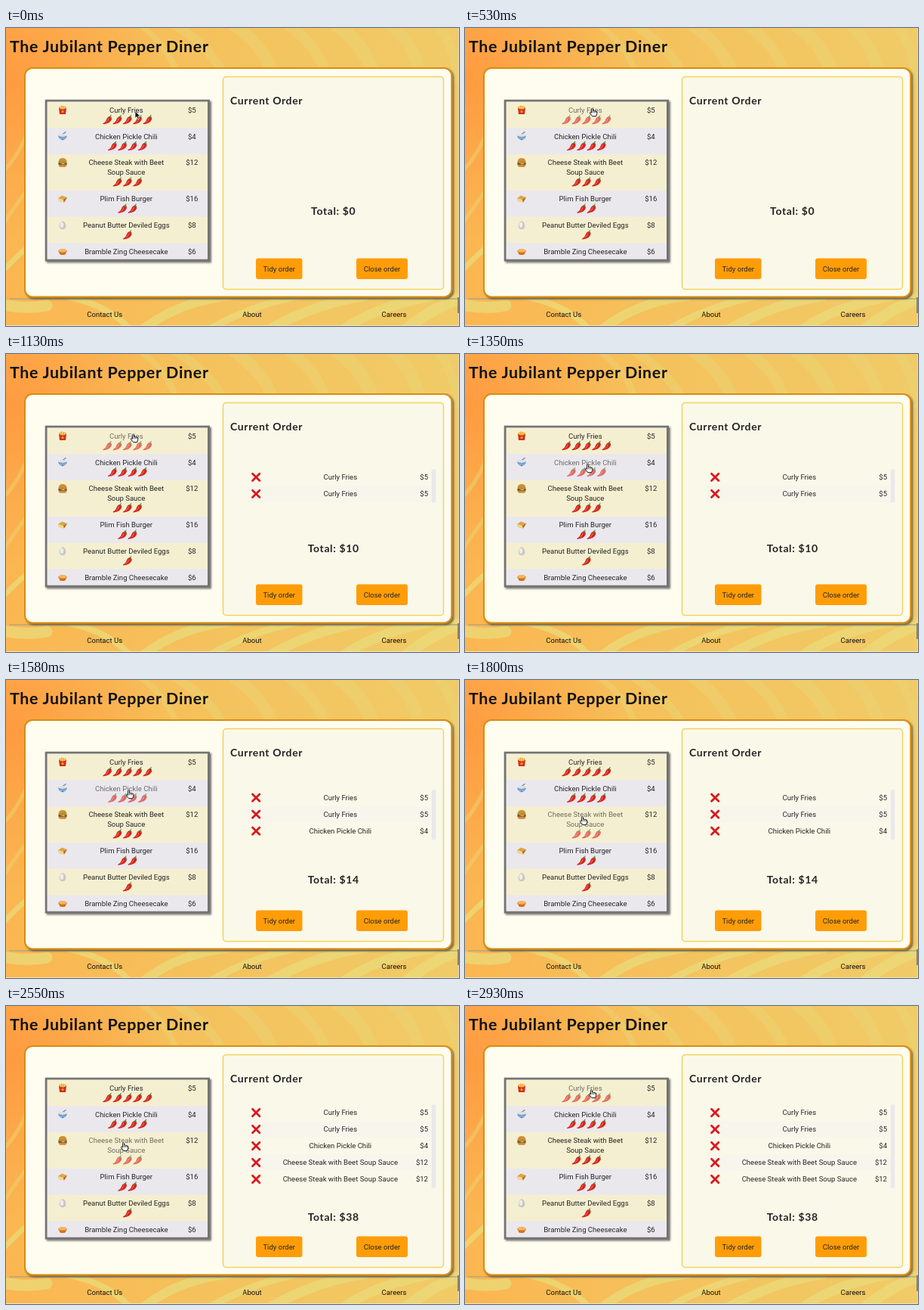
An HTML page for the animation above (3010 ms loop, 600x394 px).

```html
<!DOCTYPE html>
<html lang="en">
<head>
<meta charset="utf-8">
<title>Diner order</title>
<style>
  html, body { margin: 0; width: 100%; height: 100%; overflow: hidden; }
  svg { display: block; width: 600px; height: 394px; }
  text { font: 9.55px Roboto, sans-serif; fill: #242424; text-anchor: middle; }
  .start { text-anchor: start; }
  .end { text-anchor: end; }
  .head { font: 700 14px Lato, sans-serif; letter-spacing: .62px; }
  .title { font: 700 21.4px Lato, sans-serif; letter-spacing: .7px; fill: #111; }
  .foot { fill: #111; }
  .swirl path { fill: none; }
</style>
</head>
<body>
<svg viewBox="0 0 600 394">
  <defs>
    <linearGradient id="sky" x1="0" y1="0" x2="1" y2="0">
      <stop offset="0" stop-color="#fbb650"/>
      <stop offset=".45" stop-color="#f4c25d"/>
      <stop offset="1" stop-color="#f0cb67"/>
    </linearGradient>
    <radialGradient id="glow" gradientUnits="userSpaceOnUse" cx="0" cy="70" r="210">
      <stop offset="0" stop-color="#ff9a3f"/>
      <stop offset="1" stop-color="#ff9f45" stop-opacity="0"/>
    </radialGradient>
    <filter id="shadow" x="-5%" y="-5%" width="112%" height="112%">
      <feDropShadow dx="2" dy="2" stdDeviation="1.3" flood-color="#333" flood-opacity=".65"/>
    </filter>
    <g id="chili">
      <path d="M8.7 2.6Q12.7 2.6 12.2 6Q10.4 11.6 1.2 12.4Q-.2 12 1 11.2Q4.6 9.6 5.5 5.8Q6.3 2.9 8.7 2.6Z" fill="#d3261e"/>
      <path d="M8.2 4.6Q7.7 8 4.8 10.2" fill="none" stroke="#f8775f" stroke-width="1"/>
      <path d="M8.2 3.1Q10 1.8 11.9 3.8M10.2 2.5Q10.4 1 11.8.5" fill="none" stroke="#5c7d32" stroke-width="1.2"/>
    </g>
    <g id="fries">
      <path d="M-3.5-1V-5M-1.2-1V-6M1.2-1V-5.4M3.5-1V-5" stroke="#f0ac2c" stroke-width="1.8"/>
      <path d="M-5-3Q0 1 5-3L4 5.5H-4Z" fill="#d3301d"/>
      <circle cy="2" r="1.5" fill="#f5a623"/>
    </g>
    <g id="bowl">
      <path d="M-1-2L4.5-6" stroke="#8b7c6c" stroke-width="1.1"/>
      <path d="M-6-1.5H6Q5 5-2 5H2Q-5 5-6-1.5Z" fill="#5489c0"/>
      <ellipse cy="-1.4" rx="6" ry="2" fill="#d7e2ea"/>
      <path d="M-4 1.5L-2 3L0 1.5L2 3L4 1.5" fill="none" stroke="#d7ebff" stroke-width=".8"/>
    </g>
    <g id="burger">
      <path d="M-5.5-1Q-5-6 0-6T5.5-1Z" fill="#d28c36"/>
      <path d="M-5.5-.4H5.5" stroke="#7d8b2c" stroke-width="1.1"/>
      <path d="M-5.5 1.5H5.5" stroke="#60301a" stroke-width="2.5"/>
      <path d="M-5 .3H5L1 2.2Z" fill="#f0b83a"/>
      <path d="M-5.5 2.8H5.5Q5 5.8 3 5.8H-3Q-5 5.8-5.5 2.8Z" fill="#cf8a3b"/>
    </g>
    <g id="wrap">
      <path d="M-6-1L-1-4.5L6-2L2 4.5L-5 3Z" fill="#dda448"/>
      <path d="M-6-1L1 1L2 4.5L-5 3Z" fill="#f4d78c"/>
      <path d="M1 1L6-2L2 4.5Z" fill="#a86a28"/>
    </g>
    <g id="egg">
      <path d="M0-5.5C3-5.5 4.5-.8 4.3 1.6C4 6.8-4 6.8-4.3 1.6C-4.5-.8-3-5.5 0-5.5Z" fill="#c8c6c4"/>
      <ellipse cx="-1" cy="-.4" rx="2.3" ry="3.7" fill="#efedeb"/>
    </g>
    <g id="pie">
      <path d="M-6-1Q0-6 6-1L3.5 4Q0 5-3.5 4Z" fill="#dd7a28"/>
      <ellipse cy="-1.2" rx="5" ry="2.2" fill="#f5b75a"/>
      <path d="M-2.7 1.5L-2 4M0 1.7V4.5M2.7 1.5L2 4" stroke="#b45a20" stroke-width=".7"/>
    </g>
    <g id="arrow">
      <path d="M0 0V9.3L2.2 7.3L3.8 10.8L5.5 10L4 6.7H7Z" fill="#111" stroke="#fff" stroke-width=".7"/>
    </g>
    <g id="hand">
      <path d="M2.6 7V1.4Q3.5-.2 4.5 1.4V4.2Q5.5 3.4 6.2 4.5Q7.3 3.8 8 4.9Q9.5 4.5 9.7 6V8.2L8.6 11.4H3.8L.7 7.7Q0 6 1.5 6Z" fill="#fff" stroke="#111" stroke-width="1"/>
      <path d="M4.6 4.5V7M6.3 4.8V7M8 5.2V7" stroke="#222" stroke-width=".7"/>
    </g>
  </defs>

  <rect width="600" height="394" fill="url(#sky)"/>
  <rect width="600" height="394" fill="url(#glow)"/>
  <g class="swirl">
    <g stroke="#ecd474" opacity=".5">
      <path d="M176-5Q214 22 226 60" stroke-width="8"/>
      <path d="M222-5Q268 22 288 60" stroke-width="12"/>
      <path d="M300-5Q340 22 354 60" stroke-width="16"/>
      <path d="M372-5Q410 20 424 60" stroke-width="14"/>
      <path d="M436-5Q474 20 486 60" stroke-width="18"/>
      <path d="M510-5Q540 22 548 60" stroke-width="16"/>
      <path d="M573-3Q596 28 598 72" stroke-width="12"/>
      <path d="M-4 190Q16 170 30 135M-4 260Q14 232 30 212" stroke-width="5"/>
    </g>
    <g stroke="#ebdb7a" opacity=".75">
      <path d="M-5 322Q12 304 30 288" stroke-width="7"/>
      <path d="M-5 366Q30 372 54 367" stroke-width="15" stroke-linecap="round"/>
      <path d="M76 354Q136 366 164 398" stroke-width="8"/>
      <path d="M182 398Q230 361 298 354" stroke-width="12"/>
      <path d="M270 398Q326 366 390 354" stroke-width="9"/>
      <path d="M350 398Q412 363 478 354" stroke-width="13"/>
      <path d="M448 398Q490 368 566 354" stroke-width="13"/>
      <path d="M530 398Q562 372 602 357" stroke-width="15"/>
    </g>
  </g>
  <path d="M4 358H598" stroke="#b3a683" stroke-width="1.5"/>
  <path d="M599.5 0V394" stroke="#ead9b8"/>
  <path d="M599 356V377" stroke="#8d8371" stroke-width="2"/>
  <path d="M0 393.5H600" stroke="#f3e4bb"/>

  <text class="title start" x="5" y="32">The Jubilant Pepper Diner</text>

  <rect x="25" y="53" width="565.3" height="302.5" rx="10" fill="#fffcf0" stroke="#d88d0c" stroke-width="2" filter="url(#shadow)"/>
  <rect x="287.5" y="64.5" width="292" height="281" rx="4" fill="#faf8e9" stroke="#f1d45c" stroke-width="1.5"/>
  <rect x="53.2" y="96.2" width="215.3" height="210.8" fill="#eae8ed" stroke="#737373" stroke-width="3" filter="url(#shadow)"/>
  <g id="menu"></g>

  <text class="head start" x="297" y="100.8">Current Order</text>
  <g id="cart"></g>
  <text class="head" id="total" x="433.7"></text>

  <rect x="331" y="304.5" width="61.5" height="27.5" rx="3" fill="#ff9d08"/>
  <rect x="464" y="304.5" width="68" height="27.5" rx="3" fill="#ff9d08"/>
  <text x="361.7" y="322">Tidy order</text>
  <text x="498" y="322">Close order</text>
  <text class="foot" x="130.7" y="382.4">Contact Us</text>
  <text class="foot" x="326" y="382.4">About</text>
  <text class="foot" x="514" y="382.4">Careers</text>

  <g id="cursor"><use id="pointer" href="#arrow"/></g>
</svg>

<script>
const LOOP = 3010;
const FADE = 140;
const $ = id => document.getElementById(id);

const label = (text, x, y, cls = '') =>
  `<text class="${cls}" x="${x}" y="${y + 3.4}">${text}</text>`;

const dishes = [
  { icon: 'fries', lines: ['Curly Fries'], price: 5, heat: 5, top: 97.5, height: 35 },
  { icon: 'bowl', lines: ['Chicken Pickle Chili'], price: 4, heat: 4, top: 132.3, height: 35 },
  { icon: 'burger', lines: ['Cheese Steak with Beet', 'Soup Sauce'], price: 12, heat: 3, top: 167, height: 48 },
  { icon: 'wrap', lines: ['Plim Fish Burger'], price: 16, heat: 2, top: 215, height: 35 },
  { icon: 'egg', lines: ['Peanut Butter Deviled Eggs'], price: 8, heat: 1, top: 249.7, height: 35 },
  { icon: 'pie', lines: ['Bramble Zing Cheesecake'], price: 6, heat: 0, top: 284.5, height: 21 }
];

// Each order is [time, dish index]; each hover is [dish index, start, end].
const orders = [[600, 0], [980, 0], [1500, 1], [2100, 2], [2480, 2]];
const hovers = [
  [0, 80, 1200], [1, 1200, 1650], [2, 1650, 2640],
  [1, 2640, 2730], [0, 2730, LOOP + FADE]
];
const path = [
  [0, 171, 110], [80, 171, 110], [300, 165, 105.3],
  [1130, 165, 105.3], [1350, 159, 145.3],
  [1580, 159, 145.3], [1800, 152, 180],
  [2550, 152, 180], [2850, 165, 111.3],
  [2929, 165, 111.3], [2930, 164, 110], [LOOP, 164, 110]
];

function dishMarkup(dish, i) {
  const { lines, top, heat } = dish;
  const names = lines.map((line, n) => label(line, 159.3, top + 11 + n * 12.7)).join('');
  const chiliTop = top + 17.3 + (lines.length - 1) * 12.7;
  const chilis = Array.from({ length: heat }, (_, n) =>
    `<use href="#chili" x="${154.3 + (n - (heat - 1) / 2) * 13.3}" y="${chiliTop}"/>`).join('');
  return `<rect x="54.7" y="${top}" width="212.3" height="${dish.height}" fill="${i % 2 ? '#eae8ed' : '#f5efd1'}"/>
    <use href="#${dish.icon}" x="75" y="${top + 11}"/>
    <g class="dish">${names}${chilis}</g>
    ${label('$' + dish.price, 246.3, top + 11)}`;
}

function cartMarkup(items) {
  const first = 170.2 - 7.3 * (items.length - 1);
  const rows = items.map((dish, i) => {
    const y = first + i * 22;
    const stripe = i % 2 ? `<rect x="320" y="${y - 11}" width="244" height="22" fill="#f8f6ec"/>` : '';
    return `${stripe}<path d="M326.5 ${y - 4.7}l9.4 9.4m0-9.4l-9.4 9.4" stroke="#d91a1d" stroke-width="2.8" stroke-linecap="round"/>
      ${label(dish.lines.join(' '), 442.8, y)}${label('$' + dish.price, 559, y, 'end')}`;
  }).join('');
  const bar = items.length
    ? `<rect x="563.8" y="${first - 10.5}" width="5.4" height="${items.length * 22}" fill="#eae9ea"/>` : '';
  return rows + bar;
}

function cursorAt(t) {
  const i = path.findIndex(p => p[0] > t);
  const [t0, x0, y0] = path[i - 1];
  const [t1, x1, y1] = path[i];
  const p = (t - t0) / (t1 - t0);
  const k = p * p * (3 - 2 * p);
  return [x0 + (x1 - x0) * k, y0 + (y1 - y0) * k];
}

const clamp = v => Math.max(0, Math.min(1, v));
const hoverAmount = (dish, t) => hovers.reduce((sum, [id, start, end]) =>
  id === dish ? sum + clamp((t - start) / FADE) - clamp((t - end) / FADE) : sum, 0);

$('menu').innerHTML = dishes.map(dishMarkup).join('');
const dishGroups = document.querySelectorAll('.dish');
let shownCount = -1;

function render(t) {
  const items = orders.filter(([time]) => time <= t).map(([, id]) => dishes[id]);
  if (items.length !== shownCount) {
    shownCount = items.length;
    $('cart').innerHTML = cartMarkup(items);
    $('total').textContent = 'Total: $' + items.reduce((sum, dish) => sum + dish.price, 0);
    $('total').setAttribute('y', 247.2 + 7.4 * shownCount);
  }
  dishGroups.forEach((group, i) => group.setAttribute('opacity', 1 - .36 * hoverAmount(i, t)));
  const [x, y] = cursorAt(t);
  $('cursor').setAttribute('transform', `translate(${x} ${y})`);
  $('pointer').setAttribute('href', t < 150 ? '#arrow' : '#hand');
}

const start = performance.now();
function tick() {
  render((performance.now() - start) % LOOP);
  requestAnimationFrame(tick);
}
tick();
</script>
</body>
</html>
```
